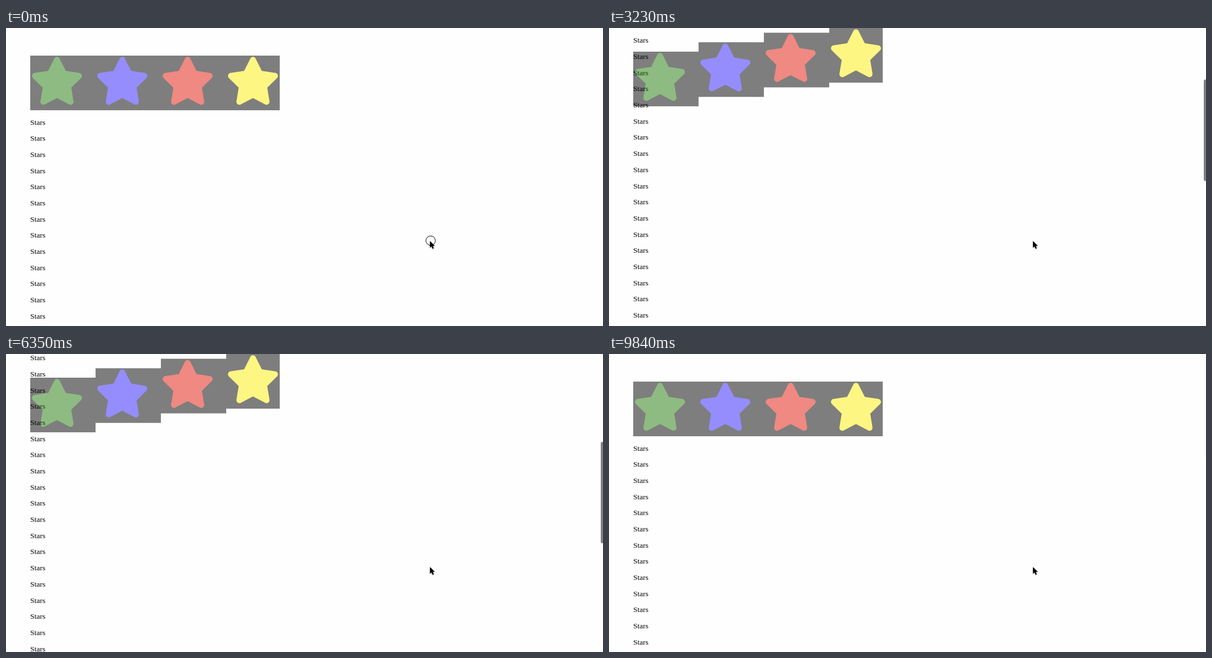
Recreate the animation shown at these times as an HTML page. Size 1060 by 529 pixels, loop 9.94 s.

```html
<!DOCTYPE html>
<html lang="en">
<head>
<meta charset="utf-8">
<title>Sticky stars</title>
<style>
  html, body { margin: 0; width: 100%; height: 100%; overflow: hidden; background: #fefefe; }
  svg { display: block; width: 1060px; height: 529px; }
  text { font: 13.5px "Liberation Serif", Times, serif; }
  #arrow { filter: drop-shadow(0 1px 1px rgba(0, 0, 0, .35)); }
</style>
</head>
<body>
<svg viewBox="0 0 1060 529">
  <g id="lines"></g>
  <g id="boxes"></g>
  <rect id="thumb" x="1056" y="2" width="8" height="180" rx="3" fill="#808080"/>
  <circle id="click" cx="754" cy="377.5" r="8.4" fill="none" stroke="#000"/>
  <path id="arrow" d="M752.8 378v12l2.7-2.5 2 4.5 2.1-.9-2-4.4h3.8z"/>
</svg>
<script>
const LOOP = 9940;
const REST_TOP = 49;
const LINE_STEP = 28.68;
const THUMB_RATIO = 0.3447;

// Sticky boxes: star colour, left edge, width, pinned top
const boxes = [
  { color: 'rgb(32,122,8)', x: 43, width: 116, pin: 42 },
  { color: 'rgb(46,30,254)', x: 159, width: 116, pin: 25.3 },
  { color: 'rgb(226,22,8)', x: 275, width: 116, pin: 8.4 },
  { color: 'rgb(255,240,8)', x: 391, width: 95, pin: 0 },
];

// Scroll keys: time (ms), offset (px), velocity (px/ms)
const scrollKeys = [
  [900, 0, .02], [1710, 59, .11], [3230, 259.8, .12], [5310, 439.3, .015],
  [6350, 447, 0], [6450, 447, 0], [7290, 98, -.2], [8180, 0, -.04],
  [8450, -8, 0], [9150, 0, 0],
];

// The screen refreshes in even runs: first time, last time, number of refreshes
const refreshRuns = [
  [980, 1710, 7], [1850, 2000, 2], [2150, 3090, 7], [3230, 3230, 1],
  [3410, 4230, 7], [4380, 5310, 7], [5460, 6350, 7], [6550, 7290, 6],
  [7440, 7590, 2], [7740, 8180, 4], [8320, 8710, 4], [8920, 9150, 3],
];
const refreshTimes = refreshRuns.flatMap(([from, to, count]) =>
  Array.from({ length: count }, (_, i) => from + (to - from) * i / Math.max(1, count - 1)));

const byId = id => document.getElementById(id);

function add(parent, tag, attributes) {
  const node = document.createElementNS('http://www.w3.org/2000/svg', tag);
  for (const name in attributes) node.setAttribute(name, attributes[name]);
  return parent.appendChild(node);
}

function starPoints(cx, cy) {
  return Array.from({ length: 10 }, (_, i) => {
    const radius = i % 2 ? 20.8 : 41.2;
    const angle = i * Math.PI / 5;
    return [cx + radius * Math.sin(angle), cy - radius * Math.cos(angle)];
  }).join(' ');
}

for (const box of boxes) {
  box.node = add(byId('boxes'), 'g', { opacity: .5 });
  add(box.node, 'rect', { x: box.x, width: box.width, height: 97 });
  add(box.node, 'polygon', {
    points: starPoints(box.x + 47.5, 48.7), fill: box.color, stroke: box.color,
    'stroke-width': 10.4, 'stroke-linejoin': 'round',
  });
}

for (let i = 0; i < 32; i++) {
  add(byId('lines'), 'text', { x: 43, y: 171.5 + i * LINE_STEP }).textContent = 'Stars';
}

function scrollAt(time) {
  const next = scrollKeys.findIndex(key => key[0] > time);
  if (next < 1) return 0;
  const [t0, s0, v0] = scrollKeys[next - 1];
  const [t1, s1, v1] = scrollKeys[next];
  const span = t1 - t0, u = (time - t0) / span, w = 1 - u;
  return s0 * w * w * (1 + 2 * u) + s1 * u * u * (3 - 2 * u)
    + span * u * w * (v0 * w - v1 * u);
}

function thumbOpacity(time) {
  if (time < 980) return 0;
  if (time < 9780) return 1;
  return time < 9840 ? .5 : .03;
}

function draw(time) {
  const shown = refreshTimes.filter(t => t <= time).pop() || 0;
  const scroll = scrollAt(shown);
  byId('lines').setAttribute('transform', `translate(0 ${-scroll})`);
  for (const box of boxes) {
    box.node.setAttribute('transform', `translate(0 ${Math.max(box.pin, REST_TOP - scroll)})`);
  }
  byId('thumb').setAttribute('y', 2 + Math.max(0, scroll) * THUMB_RATIO);
  byId('thumb').setAttribute('height', 180 + Math.min(0, scroll));
  byId('thumb').setAttribute('opacity', thumbOpacity(time));
  byId('click').setAttribute('opacity', time < 50 ? 1 : 0);
}

const start = performance.now();
function tick() {
  draw((performance.now() - start) % LOOP);
  requestAnimationFrame(tick);
}
tick();
</script>
</body>
</html>
```
